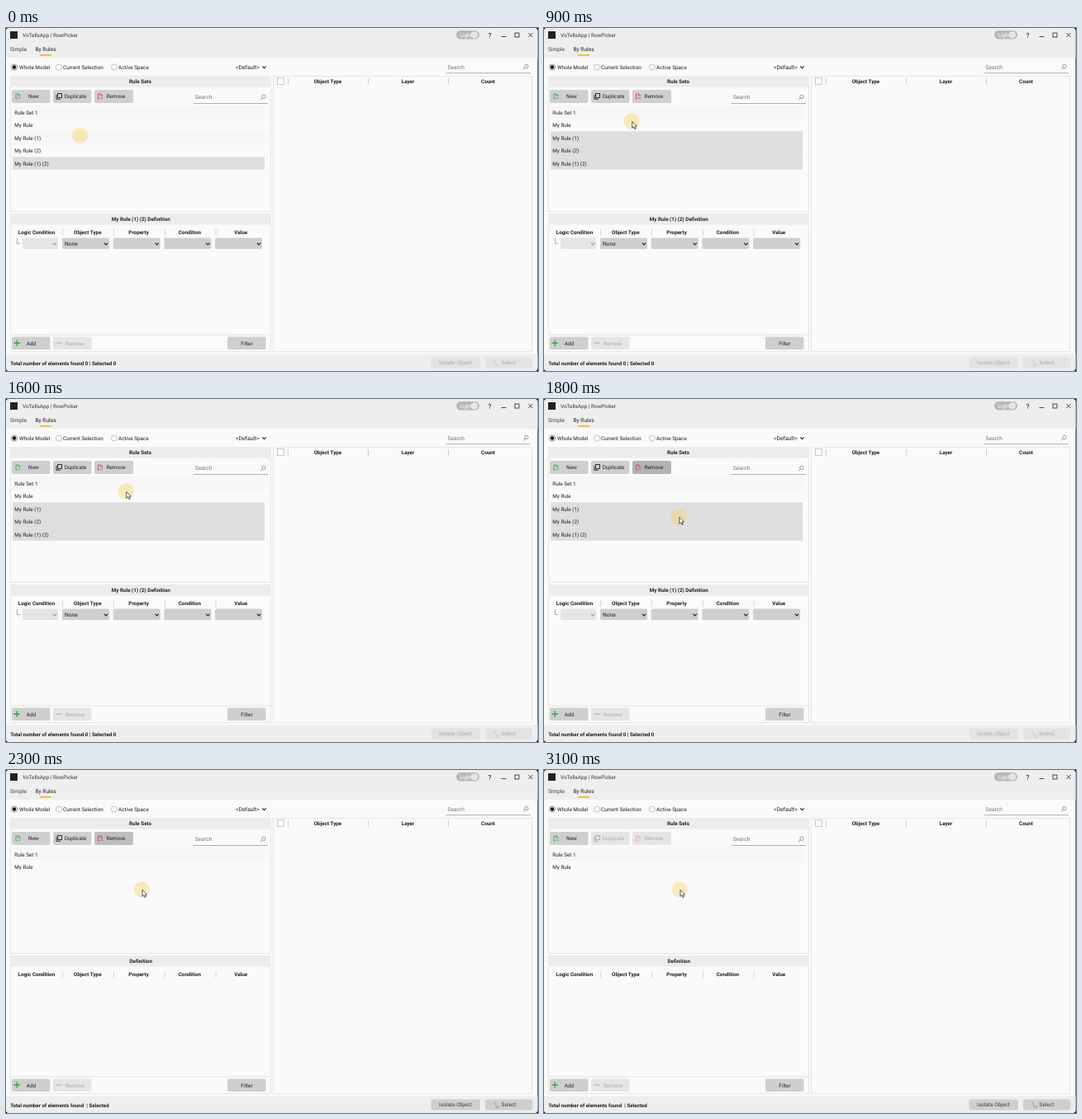
Recreate the animation shown at these times as an HTML page with a canvas. Size 644 by 416 pixels, loop 3.6 s.

```html
<!DOCTYPE html>
<html lang="en">
<head>
<meta charset="utf-8">
<title>Rule sets</title>
<style>
html, body { margin: 0; width: 100%; height: 100%; overflow: hidden; background: #111; }
canvas { display: block; width: 644px; height: 416px; }
</style>
</head>
<body>
<canvas id="stage" width="644" height="416"></canvas>
<script>
const ctx = document.getElementById('stage').getContext('2d');
ctx.textRendering = 'geometricPrecision';
const LOOP = 3600, STEP = 100;
const INK = '#202020', GREEN = '#22ac38', RED = '#e0344c', YELLOW = '#efb71f';

// Keyframes: [time, value...]
const POINTER = [[800, 89.5, 130], [900, 106, 113], [1000, 125, 93], [1100, 131, 85], [1200, 132, 83],
  [1500, 132, 83], [1600, 145, 112], [1700, 157, 133], [1800, 163, 143], [1900, 164.2, 145]];
const REMOVE_SHADE = [[1600, 207], [1700, 190], [1900, 168], [2200, 168], [2300, 190], [2400, 212], [2500, 229]];

function sample(keys, t) {
  if (t <= keys[0][0]) return keys[0].slice(1);
  const i = keys.findIndex(k => k[0] >= t);
  if (i < 0) return keys[keys.length - 1].slice(1);
  const [a, b] = [keys[i - 1], keys[i]];
  const p = (t - a[0]) / (b[0] - a[0]);
  return a.slice(1).map((v, n) => v + (b[n + 1] - v) * p);
}

function rect(x, y, w, h, fill) {
  ctx.fillStyle = fill;
  ctx.fillRect(x, y, w, h);
}

function round(x, y, w, h, r, fill) {
  ctx.beginPath();
  ctx.roundRect(x, y, w, h, r);
  ctx.fillStyle = fill;
  ctx.fill();
}

function disc(x, y, r, fill) {
  ctx.beginPath();
  ctx.arc(x, y, r, 0, Math.PI * 2);
  ctx.fillStyle = fill;
  ctx.fill();
}

function ring(x, y, r, color, width = 0.7) {
  ctx.beginPath();
  ctx.arc(x, y, r, 0, Math.PI * 2);
  ctx.strokeStyle = color;
  ctx.lineWidth = width;
  ctx.stroke();
}

function frame(x, y, w, h, color, width = 1) {
  ctx.strokeStyle = color;
  ctx.lineWidth = width;
  ctx.strokeRect(x, y, w, h);
}

function path(points, color, width = 1) {
  ctx.beginPath();
  points.forEach(([x, y]) => ctx.lineTo(x, y));
  ctx.strokeStyle = color;
  ctx.lineWidth = width;
  ctx.stroke();
}

function text(str, x, y, { size = 6.4, weight = 400, color = INK, align = 'left' } = {}) {
  ctx.font = `${weight} ${size}px Roboto, sans-serif`;
  ctx.textAlign = align;
  ctx.textBaseline = 'alphabetic';
  ctx.fillStyle = color;
  ctx.fillText(str, x, y + size * 0.355);
}

const heading = (str, x, y) => text(str, x, y, { size: 6.3, weight: 700, align: 'center' });

function chevron(x, y, color = INK) {
  path([[x - 2.2, y - 1.1], [x, y + 1.2], [x + 2.2, y - 1.1]], color, 1.1);
}

function search(x, y, right) {
  text('Search', x, y, { size: 6.7, color: '#777' });
  rect(x - 2, y + 7, right - x + 2, 1, '#b0b0b0');
  ring(right - 5, y - 0.7, 2.2, '#666', 0.6);
  path([[right - 6.6, y + 1], [right - 9, y + 3.2]], '#666', 0.7);
}

function button(x, y, w, h, label, labelX, { fill = '#cfcfcf', color = INK, size = 6.4 } = {}) {
  round(x, y, w, h, 2, fill);
  text(label, labelX, y + h / 2, { color, size, align: 'center' });
}

function page(x, y, color) {
  path([[x - 0.5, y + 3], [x - 2.5, y + 3], [x - 2.5, y - 3], [x + 0.7, y - 3], [x + 2.5, y - 1.2], [x + 2.5, y]], color, 0.8);
  path([[x + 0.3, y - 3], [x + 0.3, y - 0.8], [x + 2.5, y - 0.8]], color, 0.6);
  path([[x + 0.3, y + 2], [x + 3.3, y + 2]], color, 0.8);
}

function titleBar() {
  rect(0, 0, 644, 36, '#eeeeee');
  rect(5, 4, 9, 9, '#222');
  text('VoTellsApp | RowPicker', 20, 8.5, { color: '#333' });
  round(545, 3, 28, 10.5, 5.2, '#b8b8b8');
  text('Light', 549.5, 8.5, { size: 6.4, color: '#fff' });
  disc(567, 8.2, 4.2, '#e6e6e6');
  text('?', 585.5, 8.5, { size: 8.5, align: 'center' });
  path([[599.5, 10.5], [605.5, 10.5]], INK, 0.8);
  frame(616, 6, 5, 5, INK, 0.8);
  path([[632.5, 6], [637.5, 11]], INK, 0.8);
  path([[637.5, 6], [632.5, 11]], INK, 0.8);
}

function tabsAndScope() {
  text('Simple', 5, 26, { size: 6.6, color: '#444' });
  text('By Rules', 35.5, 26, { size: 6.6 });
  rect(41, 32, 14, 1.6, YELLOW);
  [['Whole Model', 10], ['Current Selection', 64], ['Active Space', 131]].forEach(([label, x], i) => {
    ring(x, 47.5, 3.6, i ? '#aaa' : '#666');
    if (!i) disc(x, 47.5, 2.2, '#111');
    text(label, x + (i ? 5 : 6), 47.8);
  });
  text('<Default>', 278, 47.8, { size: 6.8 });
  chevron(312.5, 47.5);
  search(534.5, 47.2, 635);
}

function panel(x, y, w, h) {
  rect(x, y, w, h, '#fafafa');
  frame(x + 0.5, y + 0.5, w - 1, h - 1, '#e6e6e6');
}

function ruleSets(t) {
  panel(5, 58, 316, 165);
  rect(5, 58, 316, 13.5, '#ececec');
  heading('Rule Sets', 162.5, 65);

  const fade = Math.min(1, Math.max(0, (t - 2300) / 200));
  const shade = v => `rgb(${v},${v},${v})`;
  const label = { color: shade(32 + 138 * fade) };
  button(7, 75, 46.5, 16, 'New', 33.5);
  page(14.5, 83, GREEN);
  button(57, 75, 46.5, 16, 'Duplicate', 84, { ...label, fill: shade(207 + 22 * fade) });
  frame(62.5, 79.5, 5, 5, label.color, 0.9);
  path([[61, 81], [61, 86.3], [66, 86.3]], label.color, 0.9);
  button(107, 75, 47, 16, 'Remove', 133, { ...label, fill: shade(sample(REMOVE_SHADE, t)[0]) });
  ctx.globalAlpha = 1 - 0.6 * fade;
  page(114, 83, RED);
  ctx.globalAlpha = 1;
  search(228.8, 84, 317);

  const rules = ['Rule Set 1', 'My Rule', 'My Rule (1)', 'My Rule (2)', 'My Rule (1) (2)'];
  rules.slice(0, t < 2300 ? 5 : 2).forEach((name, i) => {
    const y = 94.3 + i * 15.5;
    const selected = i === 4 || (i > 1 && t >= 800);
    if (selected) rect(8, y, 305, 15.5, '#dedede');
    else if (i % 2 === 0) rect(8, y, 305, 15.5, '#f6f6f6');
    text(name, 10.3, y + 8, { size: 6.35 });
  });
}

function definition(t) {
  const active = t < 2300;
  panel(5, 225, 316, 168);
  rect(5, 225, 316, 13.5, '#ececec');
  heading(active ? 'My Rule (1) (2) Definition' : 'Definition', 163.2, 232.2);
  ['Logic Condition', 'Object Type', 'Property', 'Condition', 'Value'].forEach((name, i) => {
    heading(name, 37 + i * 61.8, 248.2);
    if (i) rect(6.5 + i * 61.8, 244, 0.8, 8, '#cccccc');
    if (!active) return;
    const x = i ? 6.3 + i * 61.7 : 20;
    round(x, 254.5, i ? 57 : 43, 13.5, 1.5, i ? '#cfcfcf' : '#e5e5e5');
    chevron(i ? x + 53 : 59, 261.7, i ? INK : '#999');
  });
  if (active) {
    path([[13.5, 255], [13.5, 261.5], [17, 261.5]], '#999', 0.8);
    text('None', 71, 261.7, { size: 6.7 });
  }
  rect(5, 371.5, 316, 1, '#e6e6e6');
  button(7, 374.5, 46.5, 15.5, 'Add', 30.5);
  path([[9.5, 382], [17, 382]], GREEN, 1.3);
  path([[13.2, 378.3], [13.2, 385.8]], GREEN, 1.3);
  button(57, 374.5, 46.5, 15.5, 'Remove', 83.5, { fill: '#e5e5e5', color: '#aaa' });
  path([[60, 382], [68, 382]], '#f08f98', 1.2);
  button(268, 374.5, 46.5, 15.5, 'Filter', 291.5);
}

function results() {
  panel(323, 58, 314, 335);
  round(328, 60, 9, 9, 1, '#fdfdfd');
  frame(328.5, 60.5, 8, 8, '#b4b4b4', 0.7);
  [['Object Type', 389.5, 341], ['Layer', 486.5, 438], ['Count', 583.5, 535]].forEach(([name, x, line]) => {
    heading(name, x, 64.5);
    rect(line, 61, 0.8, 8, '#c4c4c4');
  });
}

function statusBar(t) {
  const enabled = t >= 2300;
  rect(0, 395.5, 644, 20.5, '#eeeeee');
  text(enabled ? 'Total number of elements found  | Selected' : 'Total number of elements found 0 | Selected 0',
    5.3, 407, { size: 6.2, weight: 700 });
  const look = enabled ? { size: 6.5, color: '#3a3a3a' } : { size: 6.5, fill: '#e3e3e3', color: '#aaa' };
  button(514.5, 399.5, 59.5, 13, 'Isolate Object', 544, look);
  button(580, 399.5, 57.5, 13, 'Select', 608.5, look);
  const color = enabled ? '#888' : '#c4c4c4';
  path([[590, 403.5], [592, 403.5], [593, 407.5], [596.5, 407.5]], color, 0.6);
  disc(593.5, 409.3, 0.7, color);
  disc(596, 409.3, 0.7, GREEN + (enabled ? '' : '66'));
}

function pointer(t) {
  const [x, y] = sample(POINTER, t);
  disc(x, y, 9.6, 'rgba(247,208,100,0.42)');
  if (t < 100) return;
  ctx.save();
  ctx.translate(x + 0.8, y + 0.3);
  ctx.beginPath();
  [[0, 0], [0, 8], [1.8, 6.4], [3.1, 9.3], [4.4, 8.7], [3.2, 5.9], [5.6, 5.9]].forEach(p => ctx.lineTo(...p));
  ctx.closePath();
  ctx.fillStyle = '#fff';
  ctx.fill();
  ctx.strokeStyle = '#333';
  ctx.lineWidth = 0.8;
  ctx.stroke();
  ctx.restore();
}

function draw(now) {
  const t = Math.floor((now % LOOP) / STEP) * STEP;
  rect(0, 0, 644, 416, '#111');
  ctx.save();
  ctx.beginPath();
  ctx.roundRect(0, 0, 643.5, 416, 4);
  ctx.clip();
  rect(0, 0, 644, 416, '#fafafa');
  titleBar();
  tabsAndScope();
  ruleSets(t);
  definition(t);
  results();
  statusBar(t);
  pointer(t);
  ctx.restore();
  requestAnimationFrame(draw);
}
requestAnimationFrame(draw);
</script>
</body>
</html>
```
